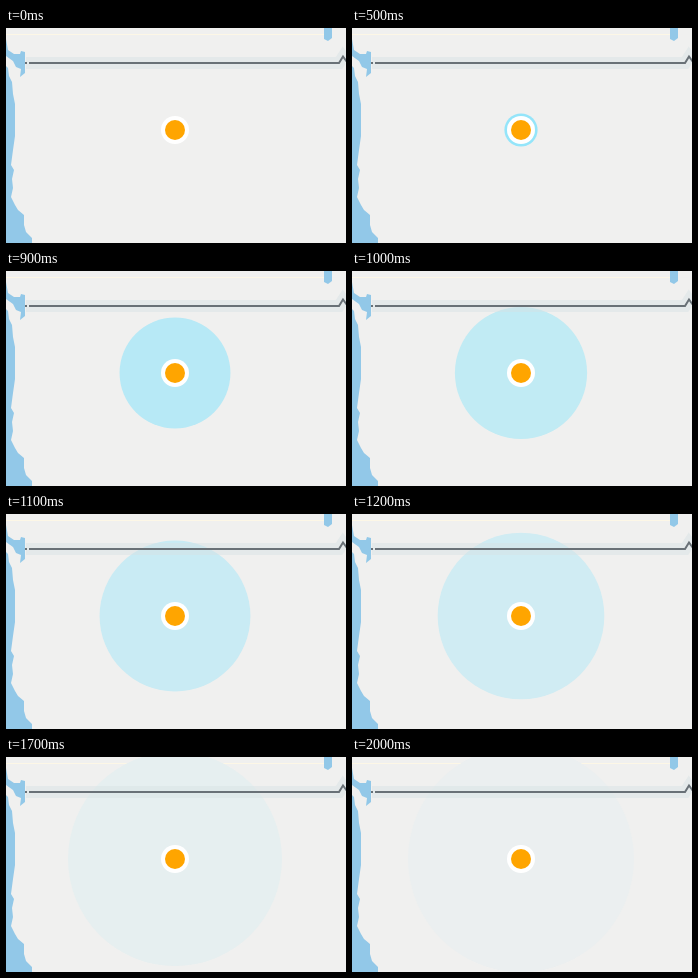
Animation, 340 px wide and 215 px high, one loop 2200 ms. Source, as an HTML page:

```html
<!DOCTYPE html>
<html lang="en">
<head>
<meta charset="utf-8">
<title>Pulsing map marker</title>
<style>
html, body { margin: 0; width: 100%; height: 100%; overflow: hidden; background: #f0f0ef; }
svg { display: block; }
</style>
</head>
<body>
<svg width="340" height="215" viewBox="0 0 340 215">
  <rect width="340" height="215" fill="#f0f0ef"/>
  <path d="M0 6.5H318" stroke="#fdf7e6"/>
  <circle id="pulse" cx="169" cy="102"/>
  <path d="M20 35H333L337 29L340 33" fill="none" stroke="#d5dfe3" stroke-opacity=".45" stroke-width="12"/>
  <g fill="#92c8e8">
    <path d="M0 11L2 22L8 26L14 26L15 23L19 24V45L14 49L15 41L10 39L7 33L0 28Z"/>
    <path d="M0 38L2 40L3 48L6 54L7 66L9 76V108L7 122L5 137L8 142L6 151L7 160L5 169L9 177L12 182L18 187L18 197L20 204L26 210V215H0Z"/>
    <path d="M318 0H326V10L322 13L318 11Z"/>
  </g>
  <path d="M19 35H21M23 35H333L337 28.5L341 34" fill="none" stroke="#697177" stroke-width="2"/>
  <circle cx="169" cy="102" r="14" fill="#fff"/>
  <circle cx="169" cy="102" r="10" fill="#ffa500"/>
</svg>
<script>
const LOOP = 2200, STEP = 100, FIRST = 500, LAST = 2000;
const LAND = [240, 240, 239], WAVE = [145, 229, 250];
const pulse = document.getElementById('pulse');

// cubic-bezier(.25, .1, .25, 1)
function ease(x) {
  const curve = (a, b, u) => 3 * a * u * (1 - u) ** 2 + 3 * b * u * u * (1 - u) + u ** 3;
  let low = 0, high = 1;
  for (let i = 0; i < 24; i++) {
    const mid = (low + high) / 2;
    if (curve(.25, .25, mid) < x) low = mid; else high = mid;
  }
  return curve(.1, 1, low);
}

function draw(now) {
  const time = now % LOOP;
  const step = Math.min(LAST, Math.floor(time / STEP) * STEP);
  const e = ease(Math.max(0, step - 395) / 2000);
  const alpha = 1 - .97 * e;
  const mix = LAND.map((c, i) => Math.round(c + (WAVE[i] - c) * alpha));
  pulse.setAttribute('r', step < FIRST ? 0 : 13 + 102.5 * e);
  pulse.setAttribute('fill', `rgb(${mix})`);
}

const start = performance.now();
function tick() {
  draw(performance.now() - start);
  requestAnimationFrame(tick);
}
tick();
</script>
</body>
</html>
```
